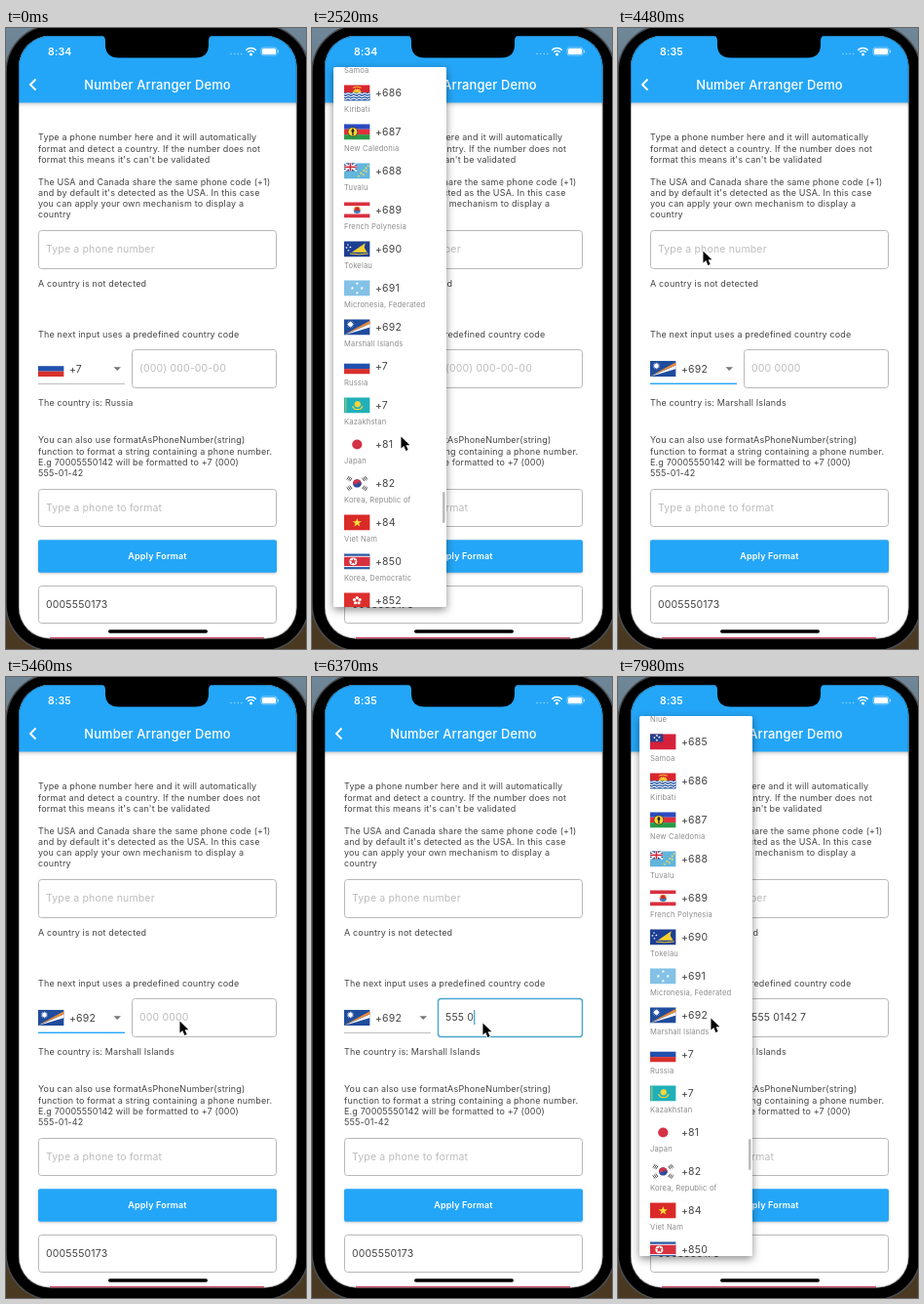
Recreate the animation shown at these times as an HTML page with a canvas. Size 308x636 px, loop 8 s.

```html
<!DOCTYPE html>
<html lang="en">
<head>
<meta charset="utf-8">
<title>Number Arranger Demo</title>
<style>
html, body { margin: 0; width: 100%; height: 100%; overflow: hidden; background: #000; }
canvas { display: block; width: 308px; height: 636px; }
</style>
</head>
<body>
<canvas id="stage"></canvas>
<script>
const W = 308, H = 636, LOOP = 8000, STEP = 70;
const BLUE = '#24a6f8', FOCUS = '#48a6cc', INK = '#444', HINT = '#bcbcbc', LINE = '#b8b8b8';
const OPEN_1 = 1610, CLOSE = 3990, CLOCK = 4340, FIELD = 5600, TYPE = 5880, OPEN_2 = 7420;
const MENU = { x: 22, y: 40, w: 116, h: 553 };
const DIGITS = '55501427';

const canvas = document.getElementById('stage');
const ctx = canvas.getContext('2d');
const ratio = window.devicePixelRatio || 1;
canvas.width = W * ratio;
canvas.height = H * ratio;

const clamp = v => Math.max(0, Math.min(1, v));
const span = (t, a, b) => clamp((t - a) / (b - a));
const ease = p => p * p * (3 - 2 * p);
const mix = (a, b, p) => a + (b - a) * p;

function rect(color, x, y, w, h) {
  ctx.fillStyle = color;
  ctx.fillRect(x, y, w, h);
}

function disc(color, x, y, r, from = 0, to = 7) {
  ctx.fillStyle = color;
  ctx.beginPath();
  ctx.arc(x, y, r, from, to);
  ctx.fill();
}

function trace(pts) {
  ctx.beginPath();
  for (let i = 0; i < pts.length; i += 2) ctx.lineTo(pts[i], pts[i + 1]);
}

function poly(color, ...pts) {
  trace(pts);
  ctx.closePath();
  ctx.fillStyle = color;
  ctx.fill();
}

function stroke(color, width, ...pts) {
  trace(pts);
  ctx.strokeStyle = color;
  ctx.lineWidth = width;
  ctx.stroke();
}

function star(color, x, y, r, points = 5, inner = 0.4) {
  const pts = [];
  for (let i = 0; i < points * 2; i++) {
    const a = i * Math.PI / points - Math.PI / 2, d = i % 2 ? r * inner : r;
    pts.push(x + d * Math.cos(a), y + d * Math.sin(a));
  }
  poly(color, ...pts);
}

// y is the middle of the capitals
function text(str, x, y, size = 9, color = INK, weight = 400, align = 'left') {
  ctx.font = `${weight} ${size}px Inter, sans-serif`;
  ctx.letterSpacing = '0.16px';
  ctx.textAlign = align;
  ctx.fillStyle = color;
  ctx.fillText(str, x, y + size * 0.36);
}

function box(x, y, w, h, color = LINE, width = 1) {
  ctx.beginPath();
  ctx.roundRect(x + 0.5, y + 0.5, w - 1, h - 1, 3);
  ctx.strokeStyle = color;
  ctx.lineWidth = width;
  ctx.stroke();
}

function withShadow(blur, dy, alpha, draw) {
  ctx.save();
  ctx.shadowColor = `rgba(0,0,0,${alpha})`;
  ctx.shadowBlur = blur * ratio;
  ctx.shadowOffsetY = dy * ratio;
  draw();
  ctx.restore();
}

function stripes(...colors) {
  colors.forEach((c, i) => rect(c, 0, i * 17 / colors.length, 27, 17 / colors.length));
}

function unionCanton() {
  rect('#24407e', 0, 0, 13, 8.5);
  stroke('#fff', 1.8, 0, 0, 13, 8.5);
  stroke('#fff', 1.8, 13, 0, 0, 8.5);
  rect('#fff', 5, 0, 3, 8.5);
  rect('#fff', 0, 2.8, 13, 3);
  rect('#d0283c', 5.7, 0, 1.6, 8.5);
  rect('#d0283c', 0, 3.5, 13, 1.6);
}

const flags = {
  niue() { stripes('#f8d33c'); unionCanton(); },
  samoa() {
    stripes('#d5213a');
    rect('#24408e', 0, 0, 13.5, 8.5);
    [[7, 1.8], [4.5, 4], [9.5, 3.6], [7, 6.7]].forEach(([x, y]) => star('#fff', x, y, 1.5));
  },
  kiribati() {
    stripes('#d8262f', '#2456a4');
    star('#f7c62f', 13.5, 8.5, 5, 14, 0.75);
    stroke('#f7c62f', 1, 9, 3, 13.5, 2, 18, 3);
    rect('#2456a4', 0, 8.5, 27, 8.5);
    for (let y = 9.5; y < 17; y += 2.7) {
      const pts = [];
      for (let x = 0; x <= 27; x++) pts.push(x, y + 0.6 * Math.sin(x * 1.1));
      stroke('#fff', 1.1, ...pts);
    }
  },
  caledonia() {
    stripes('#2a4cc0', '#e0303c', '#2a9a48');
    disc('#222', 9, 8.5, 5.2);
    disc('#f7d536', 9, 8.5, 4.7);
    rect('#222', 8.4, 4.6, 1.3, 8);
    disc('#222', 9, 7.5, 1.5);
  },
  tuvalu() {
    stripes('#62b5dc');
    unionCanton();
    [[15, 14], [17.5, 11], [20, 12.5], [20.5, 8], [23, 9], [23, 5.5], [25, 3]]
      .forEach(([x, y]) => star('#f8e050', x, y, 1.6));
  },
  polynesia() {
    stripes('#d8303f', '#fff', '#fff', '#d8303f');
    disc('#f0a23a', 13.5, 8.3, 3.7, Math.PI, 0);
    disc('#3e7fc0', 13.5, 8.6, 3.7, 0, Math.PI);
    poly('#c22c36', 10.5, 9.5, 12, 5.5, 15, 5.5, 16.5, 9.5);
  },
  tokelau() {
    stripes('#1d3f93');
    poly('#f6d02f', 8, 12, 22, 2, 21, 7, 24, 12);
    stroke('#f6d02f', 1, 6, 13.3, 15, 14.2, 25, 13.3);
    [[4, 4], [6.5, 6.5], [2.5, 7], [4.5, 10]].forEach(([x, y]) => star('#fff', x, y, 1.3));
  },
  micronesia() {
    stripes('#83c1e6');
    [[13.5, 3.4], [8.5, 8.5], [18.5, 8.5], [13.5, 13.6]].forEach(([x, y]) => star('#fff', x, y, 1.9));
  },
  marshall() {
    stripes('#1f4c9c');
    poly('#ee8a34', 0, 16.5, 27, 1.5, 27, 5);
    poly('#fff', 0, 17, 27, 5, 27, 8.5);
    star('#fff', 6.5, 5.5, 4.2, 12, 0.45);
  },
  russia() { stripes('#fff', '#2150ae', '#d8302c'); },
  kazakhstan() {
    stripes('#20b0ba');
    star('#f6d63a', 14, 7.3, 3.8, 16, 0.75);
    stroke('#f6d63a', 1.3, 8.5, 9.5, 11, 12.5, 14, 13, 17, 12.5, 19.5, 9.5);
    stroke('#d8c848', 1, 1.8, 1, 1.8, 16);
  },
  japan() { stripes('#fff'); disc('#d43245', 13.5, 8.5, 5.2); },
  korea() {
    stripes('#fff');
    disc('#2a4d9c', 13.5, 8.5, 4.4);
    disc('#d13445', 13.5, 8.5, 4.4, Math.PI + 0.5, 0.5);
    disc('#d13445', 11.6, 7.5, 2.2);
    disc('#2a4d9c', 15.4, 9.5, 2.2);
    for (const [x, y, s] of [[5.5, 3.5, -1], [21.5, 3.5, 1], [5.5, 13.5, 1], [21.5, 13.5, -1]])
      for (const d of [-1.5, 0, 1.5])
        stroke('#333', 0.9, x - 1.2 + d, y - s * (1.8 + d * 0.6), x + 1.2 + d, y + s * (1.8 - d * 0.6));
  },
  vietnam() { stripes('#da2a27'); star('#f9e03c', 13.5, 8.8, 5); },
  north() {
    stripes('#2c5ca6');
    rect('#fff', 0, 2.6, 27, 11.8);
    rect('#d9303e', 0, 3.6, 27, 9.8);
    disc('#fff', 9.5, 8.5, 4);
    star('#d9303e', 9.5, 8.5, 3.7);
  },
  hongkong() {
    stripes('#dc2f2c');
    for (let i = 0; i < 5; i++) {
      const a = i * Math.PI * 0.4 - 1.57;
      disc('#fff', 13.5 + 3 * Math.cos(a), 8.5 + 3 * Math.sin(a), 1.65);
    }
  },
  macao() {
    stripes('#168a6c');
    star('#f5d94a', 13.5, 3, 1.3);
    disc('#fff', 13.5, 10, 3.8, Math.PI, 0);
    poly('#fff', 8.5, 8, 11, 11, 16, 11, 18.5, 8, 17, 12, 10, 12);
    rect('#fff', 10.5, 13, 6, 0.9);
  },
  cambodia() {
    stripes('#2a4590', '#d82c3c', '#d82c3c', '#2a4590');
    poly('#fff', 8, 12, 8.5, 8, 10, 6.5, 11, 9, 12.3, 8, 13.5, 5, 14.7, 8, 16, 9, 17, 6.5, 18.5, 8, 19, 12);
  }
};

const rows = [
  ['niue', '+683', 'Niue'], ['samoa', '+685', 'Samoa'], ['kiribati', '+686', 'Kiribati'],
  ['caledonia', '+687', 'New Caledonia'], ['tuvalu', '+688', 'Tuvalu'],
  ['polynesia', '+689', 'French Polynesia'], ['tokelau', '+690', 'Tokelau'],
  ['micronesia', '+691', 'Micronesia, Federated'], ['marshall', '+692', 'Marshall Islands'],
  ['russia', '+7', 'Russia'], ['kazakhstan', '+7', 'Kazakhstan'], ['japan', '+81', 'Japan'],
  ['korea', '+82', 'Korea, Republic of'], ['vietnam', '+84', 'Viet Nam'],
  ['north', '+850', 'Korea, Democratic'], ['hongkong', '+852', 'Hong Kong'],
  ['macao', '+853', 'Macao'], ['cambodia', '+855', 'Cambodia']
];
const MARSHALL = 8, RUSSIA = 9;

function flag(name, y) {
  ctx.save();
  ctx.translate(33, y - 8.2);
  ctx.scale(0.985, 0.955);
  ctx.beginPath();
  ctx.rect(0, 0, 27, 17);
  ctx.clip();
  flags[name]();
  ctx.restore();
}

// [time, x, y] of the pointer tip
const path = [
  [630, 250, 640], [1260, 99, 353], [1820, 99, 353], [2380, 91, 418], [2560, 91, 418],
  [3130, 88, 334], [3290, 88, 334], [3850, 87, 228], [4480, 87, 228], [5250, 178, 352],
  [5880, 178, 352], [6300, 175, 354], [6790, 175, 354], [7280, 95, 349], [8000, 95, 349]
];

function pointer(t) {
  const i = path.findIndex(p => p[0] > t);
  if (i < 1) return;
  const [t0, x0, y0] = path[i - 1], [t1, x1, y1] = path[i];
  const p = ease(span(t, t0, t1));
  ctx.save();
  ctx.translate(mix(x0, x1, p), mix(y0, y1, p));
  ctx.scale(0.9, 0.9);
  ctx.lineJoin = 'round';
  trace([0.5, 0.5, 0.5, 14, 3.6, 11.2, 6, 16.6, 8.5, 15.5, 6.2, 10.3, 10.4, 10.2]);
  ctx.closePath();
  ctx.strokeStyle = '#fff';
  ctx.lineWidth = 1.8;
  ctx.stroke();
  ctx.fillStyle = '#000';
  ctx.fill();
  ctx.restore();
}

function header(t) {
  withShadow(4, 1, 0.22, () => rect(BLUE, 0, 0, W, 76.5));
  stroke('#fff', 1.9, 30.5, 52.5, 25, 58, 30.5, 63.5);
  text('Number Arranger Demo', 155.5, 58, 12.9, '#fff', 500, 'center');
  text(t < CLOCK ? '8:34' : '8:35', 43, 24.3, 10.5, '#fff', 600);
  for (let i = 0; i < 4; i++) disc('rgba(255,255,255,.5)', 231 + i * 3.6, 26.5, 0.8);
  ctx.strokeStyle = '#fff';
  ctx.lineWidth = 1.5;
  for (const r of [4.6, 7.4]) {
    ctx.beginPath();
    ctx.arc(251.5, 28, r, -2.36, -0.78);
    ctx.stroke();
  }
  disc('#fff', 251.5, 27, 1.5);
  ctx.strokeStyle = 'rgba(255,255,255,.6)';
  ctx.lineWidth = 0.8;
  ctx.beginPath();
  ctx.roundRect(262, 20, 16, 8, 2.4);
  ctx.stroke();
  ctx.beginPath();
  ctx.roundRect(263, 21, 14, 6, 1.6);
  ctx.fillStyle = '#fff';
  ctx.fill();
  rect('rgba(255,255,255,.6)', 279, 22.6, 1, 2.8);
}

function form(t) {
  const row = rows[t < CLOSE ? RUSSIA : MARSHALL];
  const inField = t >= FIELD && t < OPEN_2;
  const onList = (t >= OPEN_1 && t < FIELD) || t >= OPEN_2;
  [
    ['Type a phone number here and it will automatically', 112],
    ['format and detect a country. If the number does not', 123.3],
    ["format this means it's can't be validated", 134.6],
    ['The USA and Canada share the same phone code (+1)', 157.3],
    ["and by default it's detected as the USA. In this case", 168.6],
    ['you can apply your own mechanism to display a', 179.9],
    ['country', 191.2],
    ['A country is not detected', 262],
    ['The next input uses a predefined country code', 313.5],
    ['The country is: ' + row[2], 384],
    ['You can also use formatAsPhoneNumber(string)', 422],
    ['function to format a string containing a phone number.', 433.3],
    ['E.g 70005550142 will be formatted to +7 (000)', 444.6],
    ['555-01-42', 455.9]
  ].forEach(([str, y]) => text(str, 33, y));

  box(33, 207, 245, 40);
  text('Type a phone number', 41, 226.5, 10.5, HINT);

  flag(row[0], 349);
  text(row[1], 65, 349, 10.5);
  poly('#777', 110.5, 347.2, 118, 347.2, 114.2, 351);
  if (onList) rect(BLUE, 33, 363.6, 89, 1.4);
  else rect(LINE, 33, 364, 89, 0.9);

  box(129, 329, 149, 40, inField ? FOCUS : LINE, inField ? 1.4 : 1);
  const count = Math.max(0, Math.floor((t - TYPE) / 140) + 1);
  const typed = [[0, 3], [3, 7], [7, 8]]
    .map(([a, b]) => DIGITS.slice(0, count).slice(a, b)).filter(Boolean).join(' ');
  const hint = t < CLOSE ? '(000) 000-00-00' : '000 0000';
  text(typed || hint, 137, 348.5, 10.5, typed ? INK : HINT);
  if (inField) rect(FOCUS, 137 + ctx.measureText(typed).width, 341, 1.3, 15);

  box(33, 472, 245, 39);
  text('Type a phone to format', 41, 491, 10.5, HINT);
  withShadow(2.5, 1, 0.22, () => {
    ctx.beginPath();
    ctx.roundRect(33, 524.3, 245, 33.4, 2);
    ctx.fillStyle = BLUE;
    ctx.fill();
  });
  text('Apply Format', 155.5, 541, 9, '#fff', 600, 'center');
  box(33, 571, 245, 39);
  text('0005550173', 41, 590, 10.5);
}

function menu(t) {
  const first = t < OPEN_2;
  if (t <= OPEN_1 || (first && t >= CLOSE + 150)) return;
  const p = clamp((t - (first ? OPEN_1 : OPEN_2)) / 300);
  const fade = first && t >= CLOSE ? 1 - (t - CLOSE + 35) / 75 : clamp(p * 4);
  if (fade <= 0) return;
  const selected = first ? RUSSIA : MARSHALL;
  const grow = ease(span(p, 0.25, 0.5));
  const top = mix(329, MENU.y, grow), bottom = mix(369, MENU.y + MENU.h, grow);
  const scroll = first ? 80.5 * ease(span(t, 2560, 3130)) : 0;

  ctx.save();
  ctx.globalAlpha = fade;
  withShadow(9, 3, 0.45, () => {
    ctx.beginPath();
    ctx.roundRect(MENU.x, top, MENU.w, bottom - top, 1.5);
    ctx.fillStyle = '#fff';
    ctx.fill();
  });
  ctx.beginPath();
  ctx.rect(MENU.x, top, MENU.w, bottom - top);
  ctx.clip();
  rows.forEach(([name, code, label], i) => {
    const y = 346.5 + (i - selected) * 40 - scroll;
    const shown = i === selected ? 1 : clamp((p - 0.88 - i * 0.003) * 20);
    if (!shown || y < 10 || y > 610) return;
    ctx.globalAlpha = fade * shown;
    flag(name, y);
    text(code, 65, y, 10.5);
    text(label, 33, y + 16.5, 7.6, '#8c8c8c');
  });
  ctx.globalAlpha = fade * span(p, 0.5, 1);
  ctx.beginPath();
  ctx.roundRect(134, (first ? 475 : 473) + scroll / 16, 2.6, 32, 1.3);
  ctx.fillStyle = '#bcbcbc';
  ctx.fill();
  ctx.restore();
}

function screenPath() {
  ctx.beginPath();
  ctx.roundRect(13, 8, 285.5, 617.5, 32);
}

function device() {
  const back = ctx.createLinearGradient(0, 0, 0, H);
  back.addColorStop(0, '#6f8798');
  back.addColorStop(0.5, '#4a4a48');
  back.addColorStop(1, '#4a3820');
  rect(back, 0, 0, W, H);
  ctx.beginPath();
  ctx.roundRect(0, -3, 311, 641, 48);
  ctx.fillStyle = '#000';
  ctx.fill();
  ctx.strokeStyle = '#4c4e52';
  ctx.lineWidth = 1.5;
  ctx.stroke();
}

function notch() {
  ctx.fillStyle = '#000';
  ctx.beginPath();
  ctx.moveTo(97, 7);
  ctx.quadraticCurveTo(102, 8, 102, 13);
  ctx.lineTo(102, 17);
  ctx.quadraticCurveTo(102, 30.5, 116, 30.5);
  ctx.lineTo(194, 30.5);
  ctx.quadraticCurveTo(208, 30.5, 208, 17);
  ctx.lineTo(208, 13);
  ctx.quadraticCurveTo(208, 8, 213, 7);
  ctx.fill();
}

function draw(t) {
  ctx.setTransform(ratio, 0, 0, ratio, 0, 0);
  device();
  ctx.save();
  screenPath();
  ctx.clip();
  rect('#fff', 0, 0, W, H);
  form(t);
  header(t);
  rect('#d8486a', 45, 624, 220, 1.5);
  menu(t);
  ctx.beginPath();
  ctx.roundRect(105, 616.3, 102, 3.4, 1.7);
  ctx.fillStyle = '#000';
  ctx.fill();
  screenPath();
  ctx.strokeStyle = 'rgba(0,0,0,.35)';
  ctx.lineWidth = 1.6;
  ctx.stroke();
  ctx.restore();
  notch();
  pointer(t);
}

const start = performance.now();
function tick() {
  const t = Math.max(0, performance.now() - start) % LOOP;
  draw(Math.floor(t / STEP) * STEP);
  requestAnimationFrame(tick);
}
tick();
</script>
</body>
</html>
```
